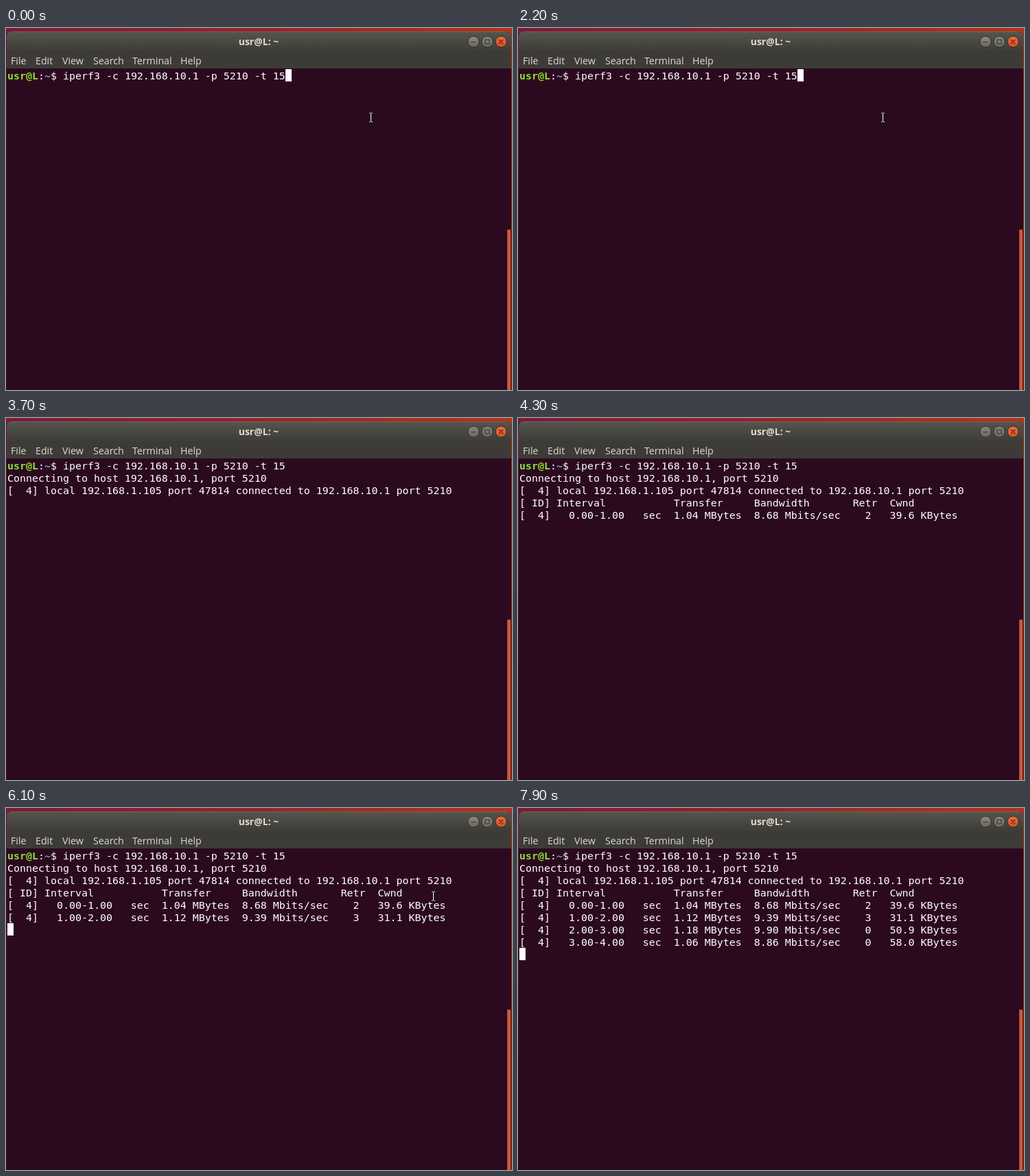
Animation, 737 px wide and 528 px high, one loop 8000 ms. Source, as an HTML page:

```html
<!DOCTYPE html>
<html lang="en">
<head>
<meta charset="utf-8">
<title>Terminal</title>
<style>
  html, body { margin: 0; width: 100%; height: 100%; overflow: hidden; background: #2b0a20; }
  svg { display: block; width: 737px; height: 528px; }
  text { white-space: pre; }
  .mono { font: 14.95px "DejaVu Sans Mono", monospace; fill: #fff; }
  .ui { font: 14.2px "Open Sans", "Noto Sans", sans-serif; fill: #dfdbd2; }
  .title { font-weight: 700; font-size: 14px; text-anchor: middle; }
  .user { font-weight: 700; fill: #8ae234; }
  .path { font-weight: 700; fill: #729fcf; }
</style>
</head>
<body>
<svg viewBox="0 0 737 528">
  <defs>
    <linearGradient id="wall">
      <stop offset="0" stop-color="#7d1a38"/>
      <stop offset=".5" stop-color="#96242c"/>
      <stop offset="1" stop-color="#b2341a"/>
    </linearGradient>
    <linearGradient id="edge" x2="0" y2="1">
      <stop offset="0" stop-color="#6d1736"/>
      <stop offset="1" stop-color="#3c0c2b"/>
    </linearGradient>
    <linearGradient id="bar" x2="0" y2="1">
      <stop offset="0" stop-color="#56554d"/>
      <stop offset="1" stop-color="#3c3b37"/>
    </linearGradient>
    <linearGradient id="grey" x2="0" y2="1">
      <stop offset="0" stop-color="#8b897f"/>
      <stop offset="1" stop-color="#6b695f"/>
    </linearGradient>
    <linearGradient id="red" x2="0" y2="1">
      <stop offset="0" stop-color="#f2703f"/>
      <stop offset="1" stop-color="#dd4a1d"/>
    </linearGradient>
  </defs>

  <rect width="737" height="528" fill="url(#wall)"/>
  <rect y="5" width="1" height="523" fill="url(#edge)"/>
  <path d="M1 528V12Q1 5 8 5H729Q736 5 736 12V528Z" fill="#2b0a20"/>
  <path d="M1 35V12Q1 5 8 5H729Q736 5 736 12V35Z" fill="url(#bar)"/>
  <path d="M7 5.5H730" stroke="#69685f"/>
  <rect x="1" y="34" width="735" height="25" fill="#3c3b37"/>
  <text class="ui title" x="368" y="25">usr@L: ~</text>
  <g id="menu"></g>

  <g stroke="#33322d">
    <circle cx="681" cy="20" r="8" fill="url(#grey)"/>
    <circle cx="701" cy="20" r="8" fill="url(#grey)"/>
    <circle cx="721" cy="20" r="8" fill="url(#red)"/>
  </g>
  <path d="M677.5 20.5H684.5M698 17H704V23H698ZM718 17L724 23M724 17L718 23" fill="none" stroke="#33322d" stroke-width="1.2"/>

  <rect x="730" y="294" width="5" height="240" rx="1" fill="#c9593c"/>

  <g id="screen"></g>
  <rect id="caret" width="9" height="18" fill="#fff"/>
  <g id="pointer" fill="none">
    <path d="M-2.5 -6.5H2.5M0 -6.5V6.5M-2.5 6.5H2.5" stroke="#000" stroke-width="3"/>
    <path d="M-2.5 -6.5H-.5M.5 -6.5H2.5M0 -6V6M-2.5 6.5H-.5M.5 6.5H2.5" stroke="#fff" stroke-width="1.2"/>
  </g>
</svg>

<script>
const LOOP = 8000, LEFT = 2, TOP = 60, CELL = 9, LINE = 18;
const $ = id => document.getElementById(id);

function addText(parent, cls, x, y, html) {
  const el = document.createElementNS("http://www.w3.org/2000/svg", "text");
  el.setAttribute("class", cls);
  el.setAttribute("x", x);
  el.setAttribute("y", y);
  el.innerHTML = html;
  parent.append(el);
  return el;
}

[["File", 7], ["Edit", 43], ["View", 82], ["Search", 127], ["Terminal", 184], ["Help", 254]]
  .forEach(([name, x]) => addText($("menu"), "ui", x, 53, name));

const report = (s, mb, rate, retr, cwnd) =>
  `[  4]   ${s}.00-${s + 1}.00   sec  ${mb} MBytes  ${rate} Mbits/sec    ${retr}   ${cwnd} KBytes`;

// [time shown, text]
const lines = [
  [0, '<tspan class="user">usr@L</tspan>:<tspan class="path">~</tspan>$ iperf3 -c 192.168.10.1 -p 5210 -t 15'],
  [3300, "Connecting to host 192.168.10.1, port 5210"],
  [3300, "[  4] local 192.168.1.105 port 47814 connected to 192.168.10.1 port 5210"],
  [4300, "[ ID] Interval           Transfer     Bandwidth       Retr  Cwnd"],
  [4300, report(0, "1.04", "8.68", 2, "39.6")],
  [5300, report(1, "1.12", "9.39", 3, "31.1")],
  [6300, report(2, "1.18", "9.90", 0, "50.9")],
  [7300, report(3, "1.06", "8.86", 0, "58.0")]
].map(([at, text], row) => ({ at, el: addText($("screen"), "mono", LEFT, TOP + 15 + row * LINE, text) }));

// [time, column, row], or [time] when hidden
const caretSteps = [
  [0, 45, 0], [400], [1500, 45, 0], [1600], [2200, 45, 0], [2800], [3100, 45, 0],
  [3300, 0, 3], [3700], [4500, 0, 5], [4900], [5600, 0, 6], [6200],
  [6800, 0, 7], [7300, 0, 8], [7500], [7900, 0, 8]
];

// [time, x, y], or [time] when hidden
const pointerSteps = [
  [0, 531.5, 130.5], [3100], [5600, 531.5, 130.5], [5700, 553.5, 167.5], [5800, 574.5, 203.5],
  [6000, 598.5, 166.5], [6100, 622.5, 128.5], [6200, 646.5, 90.5], [6300]
];

function place(el, steps, t, toXY) {
  const [, a, b] = steps.findLast(s => s[0] <= t);
  const shown = a !== undefined;
  el.style.display = shown ? "" : "none";
  if (shown) el.setAttribute("transform", `translate(${toXY(a, b)})`);
}

const start = performance.now();
function draw(now) {
  const t = Math.max(0, now - start) % LOOP;
  for (const { at, el } of lines) el.style.display = t >= at ? "" : "none";
  place($("caret"), caretSteps, t, (col, row) => [LEFT + col * CELL, TOP + row * LINE]);
  place($("pointer"), pointerSteps, t, (x, y) => [x, y]);
  requestAnimationFrame(draw);
}
draw(start);
</script>
</body>
</html>
```
